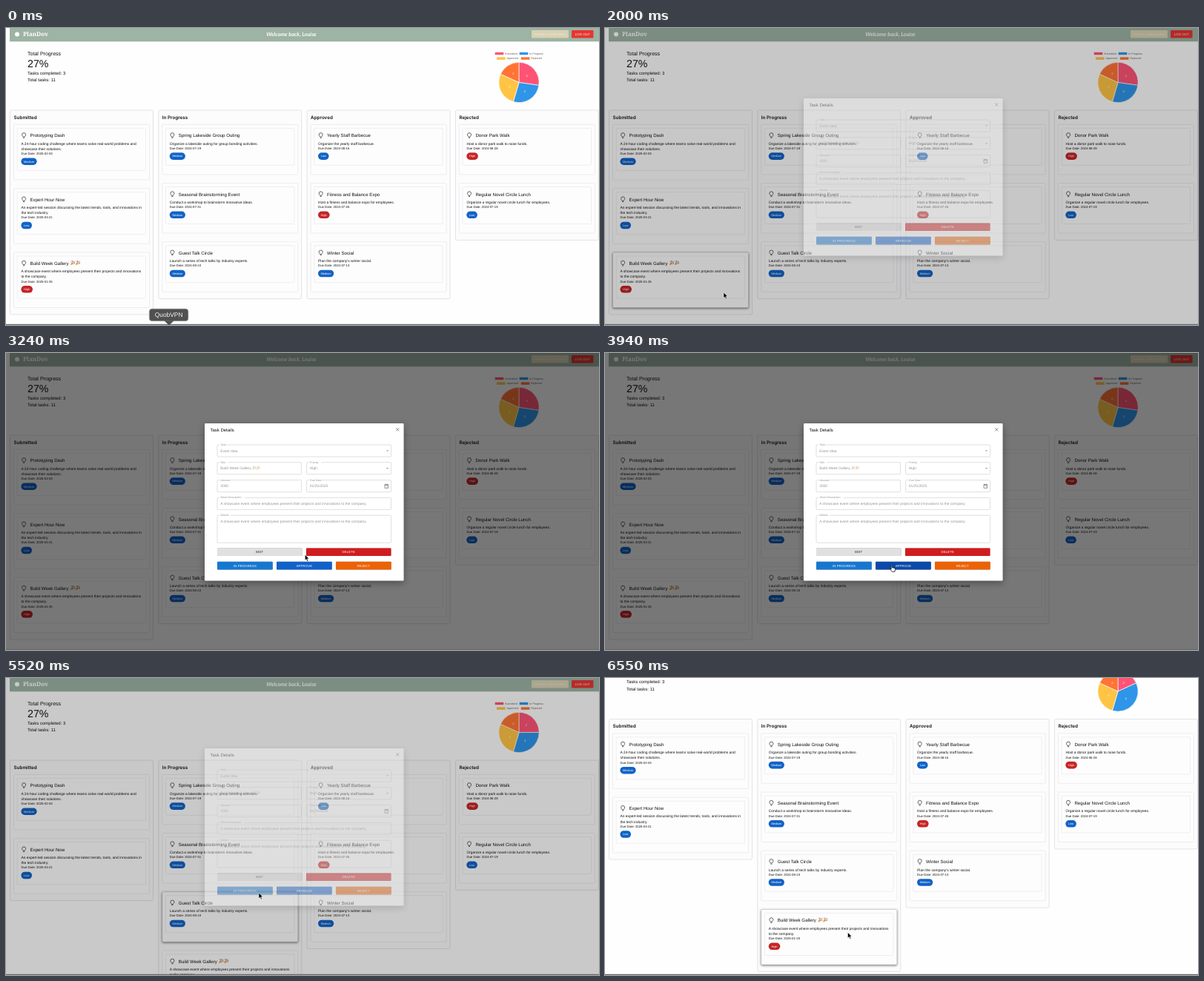
Animation, 800 px wide and 401 px high, one loop 7030 ms. Source, as an HTML page:

```html
<!DOCTYPE html>
<html lang="en">
<head>
<meta charset="utf-8">
<title>Task board</title>
<style>
html, body { margin: 0; width: 100%; height: 100%; overflow: hidden; background: #fefefe; }
svg { display: block; width: 800px; height: 401px; }
text { font-family: "Liberation Sans", Arial, sans-serif; text-rendering: geometricPrecision; white-space: pre; }
.head { font-family: Inter, sans-serif; font-weight: 600; }
.brand { font-family: "Noto Serif", serif; font-weight: 600; }
.hello { font-family: Lato, sans-serif; font-style: italic; font-weight: 700; }
.caps { letter-spacing: .12px; }
.card { fill: #fdfdfe; stroke: #e2e2e6; stroke-width: .6; }
.card.hot { stroke: #c4c4c4; filter: drop-shadow(0 1px 1.6px rgba(0,0,0,.55)); }
.btn { filter: drop-shadow(0 .6px .6px rgba(0,0,0,.4)); }
.sheet { filter: drop-shadow(0 3px 5px rgba(0,0,0,.35)); }
</style>
</head>
<body>
<svg id="stage" viewBox="0 0 800 401"></svg>
<script>
const LOOP = 7030, MOVED = 5450;
const PINK = '#ff5376', BLUE = '#2f95e8', YELLOW = '#ffc444', ORANGE = '#ff7434';

const text = (x, y, size, str, fill = '#111', extra = '') =>
  `<text x="${x}" y="${y}" font-size="${size}" fill="${fill}" ${extra}>${str}</text>`;
const rect = (x, y, w, h, fill, extra = '') =>
  `<rect x="${x}" y="${y}" width="${w}" height="${h}" fill="${fill}" ${extra}/>`;
const path = (d, extra) => `<path d="${d}" ${extra}/>`;
const MID = 'text-anchor="middle"';

// title, description lines, due date, priority
const prototype = ['Prototyping Dash', ['A 24-hour coding challenge where teams solve real-world problems and', 'showcase their solutions.'], '2025-02-03', 'Medium'];
const experts = ['Expert Hour Now', ['An expert-led session discussing the latest trends, tools, and innovations in', 'the tech industry.'], '2025-03-21', 'Low'];
const gallery = ['Build Week Gallery', ['A showcase event where employees present their projects and innovations', 'to the company.'], '2025-01-25', 'High', true];
const running = [
  ['Spring Lakeside Group Outing', ['Organize a lakeside outing for group bonding activities.'], '2024-07-19', 'Medium'],
  ['Seasonal Brainstorming Event', ['Conduct a workshop to brainstorm innovative ideas.'], '2024-07-31', 'Medium'],
  ['Guest Talk Circle', ['Launch a series of tech talks by industry experts.'], '2024-08-10', 'Medium']
];
const approved = [
  ['Yearly Staff Barbecue', ['Organize the yearly staff barbecue.'], '2024-08-16', 'Low'],
  ['Fitness and Balance Expo', ['Host a fitness and balance expo for employees.'], '2024-07-26', 'High'],
  ['Winter Social', ["Plan the company's winter social."], '2024-07-13', 'Medium']
];
const rejected = [
  ['Donor Park Walk', ['Host a donor park walk to raise funds.'], '2024-06-28', 'High'],
  ['Regular Novel Circle Lunch', ['Organize a regular novel circle lunch for employees.'], '2024-07-19', 'Low']
];
const boards = [
  [[prototype, experts, gallery], running, approved, rejected],
  [[prototype, experts], [...running, gallery], approved, rejected]
];
const HEADS = ['Submitted', 'In Progress', 'Approved', 'Rejected'];
const CHIP = { Medium: [21.2, '#1263c6'], Low: [14.6, '#1263c6'], High: [15.6, '#c62526'] };

function poppers(x, y, size, opacity = 1) {
  const one = dx => `<g transform="translate(${x + dx * size} ${y}) scale(${size / 6.8})">` +
    path('M.3 0L2.2-4.4 4.8-1.8Z', 'fill="#d9a23a"') +
    path('M2.8-4.2q1-.9.3-2M4.8-2.2q1-1 1.8-.2', 'fill="none" stroke="#c8343e" stroke-width=".9"') +
    path('M3.6-3.2L5.8-5.6', 'stroke="#4a7fb8" stroke-width=".8"') +
    path('M1-5.4h.9M5.6-4h.9', 'stroke="#b9702c" stroke-width=".9"') + '</g>';
  return `<g opacity="${opacity}">${one(0)}${one(1)}</g>`;
}

function buildBoard(columns) {
  let svg = '';
  const boxes = [];
  columns.forEach((cards, i) => {
    const x = 5.5 + 200.3 * i;
    let y = 130.4, body = '';
    for (const [title, lines, due, level, party] of cards) {
      const drop = 7.1 * (lines.length - 1), h = 67.4 + drop;
      const [w, fill] = CHIP[level];
      boxes.push({ x: x + 5, y, w: 183, h });
      body += rect(x + 5, y, 183, h, '#fff', 'class="card" rx="1.2"') +
        rect(x + 9.7, y + 4.9, 173.4, 50 + drop, 'none', 'stroke="#e4e4e7" stroke-width=".6" rx="1"') +
        path('M-1.1 2C-1.1 1-2.5.7-2.5-1a2.5 2.5 0 0 1 5 0C2.5.7 1.1 1 1.1 2ZM-1 3.2H1',
          `transform="translate(${x + 18.6} ${y + 14.7})" fill="none" stroke="#333" stroke-width=".75"`) +
        text(x + 27, y + 16.9, 6.13, title) +
        (party ? poppers(x + 81, y + 17.3, 6.8) : '');
      lines.forEach((s, n) => body += text(x + 15, y + 27.2 + 7.1 * n, 4.9, s));
      body += text(x + 15, y + 33.6 + drop, 4.28, 'Due Date: ' + due) +
        rect(x + 14.9, y + 37.9 + drop, w, 9.6, fill, 'rx="4.8"') +
        text(x + 14.9 + w / 2, y + 44 + drop, 3.9, level, '#fff', MID);
      y += h + 11.8;
    }
    svg += rect(x, 111, 193, y - 113.4, '#fcfcfd', 'stroke="#d9d9dd" stroke-width=".7" rx="2"') +
      text(x + 5, 122.9, 6.3, HEADS[i], '#111', 'class="head"') + body;
  });
  return { svg, boxes };
}
const built = boards.map(buildBoard);

const stats = text(29, 37, 7.07, 'Total Progress') + text(29, 52.6, 14.2, '27%') +
  text(29, 62.6, 6, 'Tasks completed: 3') + text(29, 72.3, 6, 'Total tasks: 11');

const header = rect(5, 0, 795, 18.3, '#9db3a3') +
  '<circle cx="15" cy="8.4" r="3" fill="#fff"/>' +
  text(23, 11.3, 8, 'PlanDov', '#fff', 'class="brand"') +
  text(385, 10.9, 7.3, 'Welcome back, Louise', '#fff', `class="hello" ${MID}`) +
  rect(709, 3, 50, 10.5, '#d8d1b3', 'rx="1.2"') +
  text(734, 9.8, 4.28, 'SHARE A NEW IDEA', '#ece7d2', `class="caps" ${MID}`) +
  rect(763, 3, 29.5, 10.5, '#e53632', 'rx="1.2"') +
  text(777.8, 9.8, 4.28, 'LOG OUT', '#fff', `class="caps" ${MID}`);

const legend = [[659.7, 32.8, PINK], [692.7, 32.8, BLUE], [662, 39.4, YELLOW], [694.8, 39.4, ORANGE]]
  .map(([x, y, c], i) => rect(x, y, 11.6, 3.4, c) + text(x + 13.4, y + 3, 3.7, HEADS[i], '#666')).join('');
const slices = [PINK, BLUE, YELLOW, ORANGE]
  .map(c => `<g class="slice"><path fill="${c}" stroke="#fff" stroke-width=".7"/>${text(0, 0, 4, '', '#fff', MID)}</g>`).join('');

const GREY = '#949494';
function field(x, y, w, h, label, value) {
  return rect(x, y, w, h, 'none', 'stroke="#cacaca" stroke-width=".6" rx="1.2"') +
    rect(x + 3.4, y - 1, label.length * 1.85 + 1.8, 2, '#fff') +
    text(x + 4.4, y + 1, 3.68, label, GREY) + text(x + 4.2, y + 9.7, 4.9, value, GREY);
}
const buttons = [
  { x: 285, y: 263.5, w: 114.5, label: 'EDIT', fill: '#e0e0e0', hot: '#d0d0d0', ink: '#222' },
  { x: 405, y: 263.5, w: 114.5, label: 'DELETE', fill: '#d01c1f', hot: '#b01518' },
  { x: 285, y: 281.8, w: 74.8, label: 'IN PROGRESS', fill: '#1777d0', hot: '#0d4f93' },
  { x: 365, y: 281.8, w: 74.8, label: 'APPROVE', fill: '#1161cb', hot: '#0a4aa8' },
  { x: 445, y: 281.8, w: 74.8, label: 'REJECT', fill: '#ec6206', hot: '#d05000' }
];
const BTN_H = 10.6;
const summary = 'A showcase event where employees present their projects and innovations to the company.';
const caret = y => path(`M513 ${y}h3.2l-1.6 1.7Z`, 'fill="#999"');
const modal = rect(268, 95, 268.6, 212.6, '#fff', 'rx="1.4" class="sheet"') +
  text(275.4, 106.2, 6, 'Task Details') +
  path('M526.3 101.4l4 4m0-4l-4 4', 'stroke="#666" stroke-width=".8"') +
  field(285, 124, 234.6, 16, 'Task', 'Event Idea') + caret(131.3) +
  field(285, 147.7, 113.6, 16, 'Title', gallery[0]) + poppers(332, 157.6, 5.4, .5) +
  field(405.6, 147.7, 114, 16, 'Priority', 'High') + caret(155) +
  field(285, 171.6, 113.6, 16, 'Amount', '3000') +
  field(405.6, 171.6, 114, 16, 'Due Date', '01/25/2025') +
  path('M511 177.6h4.6v4.8h-4.6ZM511 178.6h4.6M512 176.6v1M514.6 176.6v1M513.4 180.6h1.1', 'fill="none" stroke="#777" stroke-width=".75"') +
  field(285, 195.4, 234.6, 16, 'Short Description', summary) +
  field(285, 219.2, 234.6, 37, 'Details', summary) +
  buttons.map(b => rect(b.x, b.y, b.w, BTN_H, b.fill, 'rx="1" class="btn"') +
    text(b.x + b.w / 2, b.y + 6.8, 4.28, b.label, b.ink || '#fff', `class="caps" ${MID}`)).join('');

const tip = rect(193.4, 379.2, 52.4, 16.4, '#505050', 'rx="3.6" stroke="#8a8a8a" stroke-width=".6"') +
  path('M213.5 395.2h13l-5 4.8q-1.5 1-3 0Z', 'fill="#505050"') +
  text(219.6, 390.4, 8.4, 'QuobVPN', '#f4f4f4', MID);

const arrow = path('M0 0V7.6L1.8 6 3 8.8 4.3 8.2 3.1 5.5H5.5Z', 'fill="#000" stroke="#fff" stroke-width=".5"');
const hand = path('M.2.6q.7-1 1.4 0V3.2l3 .7q1 .3.9 1.4L5 8.8H1.2L-1.4 5.6q-.2-1.2 1.6-.2Z',
  'fill="#fff" stroke="#000" stroke-width=".7" stroke-linejoin="round"');

const stage = document.getElementById('stage');
stage.innerHTML = rect(0, 0, 800, 401, '#fefefe') +
  `<g id="page">${header}${stats}${legend}${slices}` +
  built.map(b => `<g class="board">${b.svg}</g>`).join('') + '</g>' +
  rect(0, 0, 800, 401, '#000', 'id="shade"') +
  `<g id="modal">${modal}</g>` + rect(0, 399.8, 800, 1.2, '#6b6b6b') +
  `<g id="tip">${tip}</g><g id="cursor"><g id="arrow">${arrow}</g><g id="hand">${hand}</g></g>`;

const all = s => [...stage.querySelectorAll(s)];
const id = s => document.getElementById(s);
const show = (el, on) => { el.style.display = on ? '' : 'none'; };
const boardEls = all('.board'), sliceEls = all('.slice');
boardEls.forEach((g, i) => g.querySelectorAll('.card').forEach((el, n) => { built[i].boxes[n].el = el; }));
all('.btn').forEach((el, i) => { buttons[i].el = el; });

const clamp = v => Math.min(1, Math.max(0, v));
const ramp = (t, a, b) => clamp((t - a) / (b - a));
const ease = u => u * u * (3 - 2 * u);
const mix = (a, b, u) => a + (b - a) * u;

// time, x, y of the pointer
const TRACK = [
  [0, 220, 412], [350, 219, 408], [1000, 172, 365], [1400, 160, 357], [2200, 160, 357],
  [2470, 418, 260], [2950, 416, 262], [3600, 386, 286.5], [4050, 386, 286.5], [4360, 341, 290],
  [4390, 341, 290], [4450, 396, 268], [4690, 396, 268], [4790, 396, 283], [4970, 396, 283],
  [5200, 341, 290], [6080, 341, 290], [6420, 327.5, 343.5], [LOOP, 327.5, 343.5]
];
function pointer(t) {
  const i = TRACK.findIndex(k => k[0] > t), [t0, x0, y0] = TRACK[i - 1], [t1, x1, y1] = TRACK[i];
  const u = ease(ramp(t, t0, t1));
  return [mix(x0, x1, u), mix(y0, y1, u)];
}

const counts = boards.map(b => b.map(c => c.length));
function drawPie(t, now) {
  const u = 1 - (1 - ramp(t, MOVED, MOVED + 1000)) ** 4;
  const at = (a, r) => [692 + r * Math.sin(a), 73.5 - r * Math.cos(a)];
  let a = 0;
  sliceEls.forEach((el, i) => {
    const end = a + mix(counts[0][i], counts[1][i], u) / 11 * 2 * Math.PI;
    const [shape, label] = el.children, [x, y] = at((a + end) / 2, 14);
    shape.setAttribute('d', `M692 73.5L${at(a, 27.2)}A27.2 27.2 0 0 1 ${at(end, 27.2)}Z`);
    label.setAttribute('x', x);
    label.setAttribute('y', y + 1.4);
    label.textContent = counts[now][i];
    a = end;
  });
}

function render(t) {
  const [x, y] = pointer(t);
  const open = ramp(t, 1910, 2135) * (1 - ramp(t, 5400, 5600));
  const scroll = 55.5 * ease(ramp(t, 6100, 6390));
  const now = t < MOVED ? 0 : 1;
  const inside = (b, py, h) => x >= b.x && x <= b.x + b.w && py >= b.y && py <= b.y + h;

  id('page').setAttribute('transform', `translate(0 ${-scroll})`);
  boardEls.forEach((el, i) => show(el, i === now));
  for (const c of built[now].boxes) c.el.classList.toggle('hot', open < .5 && inside(c, y + scroll, c.h));
  id('shade').style.opacity = open * .53;
  id('modal').style.opacity = open;
  show(id('modal'), open > 0);

  let onButton = false;
  for (const b of buttons) {
    const hot = open > .5 && inside(b, y, BTN_H);
    b.el.setAttribute('fill', hot ? b.hot : b.fill);
    onButton = onButton || hot;
  }
  show(id('hand'), onButton);
  show(id('arrow'), !onButton);
  id('cursor').setAttribute('transform', `translate(${x} ${y})`);
  id('tip').style.opacity = 1 - ramp(t, 330, 450);
  drawPie(t, now);
}

const start = performance.now();
function tick() {
  render((performance.now() - start) % LOOP);
  requestAnimationFrame(tick);
}
tick();
</script>
</body>
</html>
```
